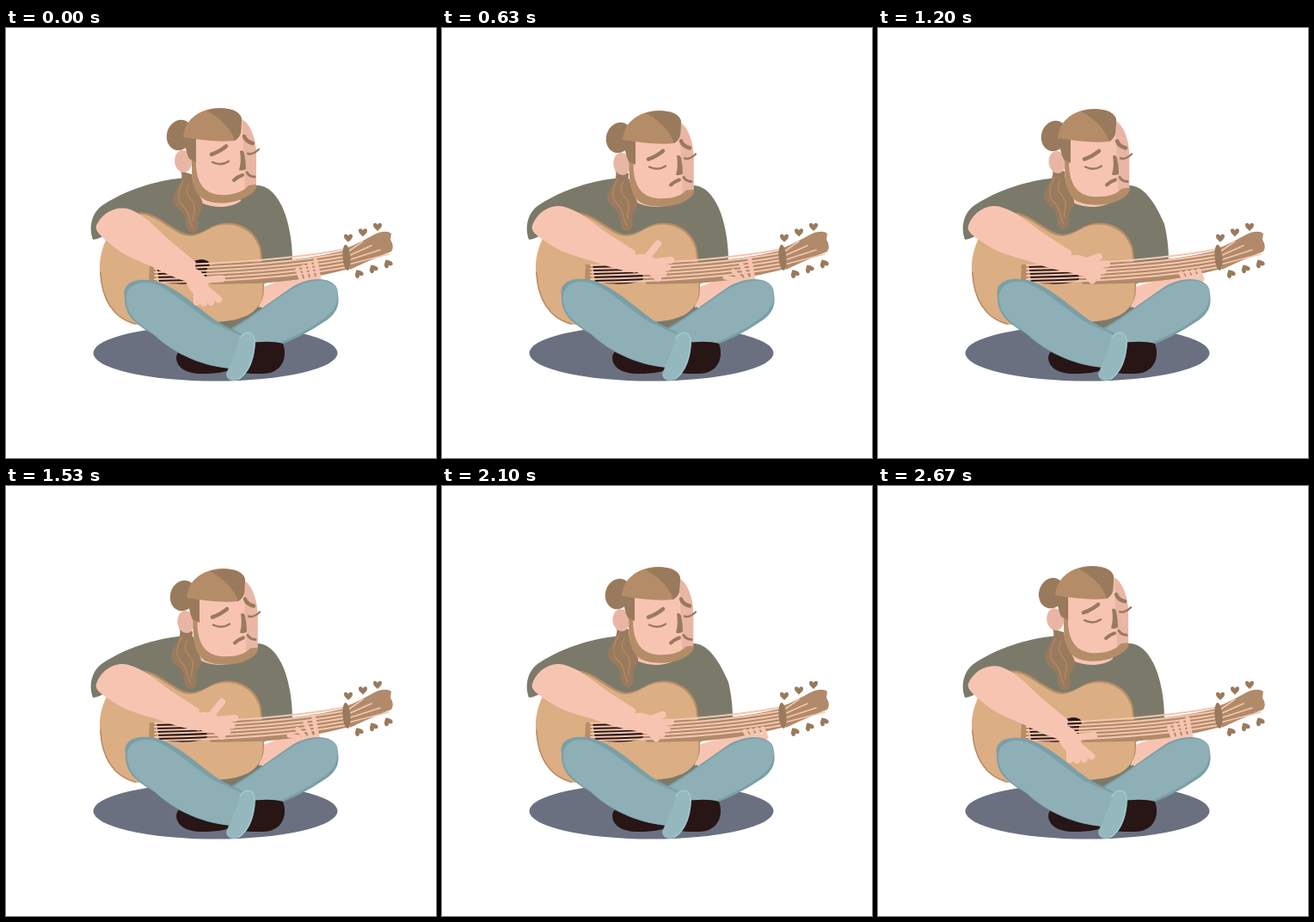
An HTML page with a canvas that plays this animation: 500 by 500 pixels, repeating every 2700 ms.

```html
<!DOCTYPE html>
<html lang="en">
<head>
<meta charset="utf-8">
<title>Guitarist</title>
<style>
  html, body { margin: 0; width: 100%; height: 100%; overflow: hidden; background: #fff; }
  canvas { display: block; width: 500px; height: 500px; }
</style>
</head>
<body>
<canvas id="stage" width="500" height="500"></canvas>
<script>
const ctx = document.getElementById('stage').getContext('2d');
const PERIOD = 900, STEP = 30;
const C = {
  shadow: '#6a7080', shirt: '#7b7a6a', skin: '#f8c4b2', blush: '#e9b6a6',
  jeans: '#8dafb5', denim: '#7b9fa6', cuff: '#94b8be', hem: '#a4cbd1', shoe: '#281516',
  wood: '#dcae83', edge: '#b88d66', neck: '#b18a6a',
  hair: '#9a7a5c', hairLight: '#b48c68', string: '#f5c6ad'
};

function ease(from, to, time) {
  const u = Math.min(1, Math.max(0, (time - from) / (to - from)));
  return u * u * (3 - 2 * u);
}

function fill(color, path) {
  ctx.fillStyle = color;
  ctx.fill(new Path2D(path));
}

function line(color, width, path) {
  ctx.strokeStyle = color;
  ctx.lineWidth = width;
  ctx.stroke(new Path2D(path));
}

function oval(color, x, y, rx, ry, angle = 0) {
  ctx.fillStyle = color;
  ctx.beginPath();
  ctx.ellipse(x, y, rx, ry, angle, 0, Math.PI * 2);
  ctx.fill();
}

function place(x, y, angle, draw) {
  ctx.save();
  ctx.translate(x, y);
  ctx.rotate(angle);
  draw();
  ctx.restore();
}

function drawBody(press) {
  oval(C.shadow, 243.5, 378, 142, 32.5);
  fill(C.shoe, 'M198 383C199 371 216 371 234 378L266 392C262 400 246 402 228 402C208 402 198 394 198 383Z');
  const reach = 5 * press;
  fill(C.shirt, `M101 246C96 232 99 214 114 205C139 189 173 177 207 174.5L291 183
    C308 182 322 202 ${328 + reach} 228C${332 + reach} 245 ${333 + reach} 258 ${333 + reach} 272
    L297 300L298 340L262 352L150 320L150 250L113 242Q106 246 101 246Z`);
}

function drawHead(lift, drift) {
  const x = 3 * lift + drift, y = lift + 2 * drift, nod = 5.5 * lift;
  fill(C.skin, 'M222 180L272 185L273 201C259 212 231 209 221 199Z');
  place(x, y, 0, () => oval(C.hair, 202, 124.5, 15, 18, .3));
  place(-lift - drift, 2 * drift - 4 * lift, 0, () => {
    fill(C.hair, `M203 166C209 178 194 190 194 200C195 209 205 212 208 219
      C210 226 208 236 216 238C225 238 224 229 223 222C223 215 230 213 229 205
      C228 195 217 190 219 171Z`);
    line(C.hairLight, 1.2, 'M206 178C199 191 199 202 207 208C214 215 212 225 217 232M213 181C205 194 217 198 219 206C221 213 216 218 218 224');
  });

  place(x * .4, y, 0, () => {
    const jaw = 183 + nod * .5, chin = 203 + nod * .2;
    fill(C.skin, `M213 128L273 106C283 108 291 128 291 149L291 ${jaw}
      C286 195 268 ${chin} 246 ${chin}C226 ${chin} 216 187 216 165Z`);
    fill(C.blush, `M275 107C285 113 291 130 291 149L291 ${jaw}L278 ${jaw + 7}L276 142Z`);
    oval(C.blush, 206 + x * .4, 155, 10, 13, -.12);
    fill(C.hairLight, `M213 140L221 146L221 160C222 180 230 ${chin - 11} 248 ${chin - 9}
      C264 ${chin - 8} 277 ${jaw + 7} 282 ${jaw}L291 ${jaw - 1}C293 ${jaw + 5} 286 ${jaw + 10} 278 ${jaw + 14}
      C264 ${chin + 2} 240 ${chin + 3} 228 ${chin - 5}C217 190 216 174 216 155Z`);
  });

  place(x, y, 0, () => {
    fill(C.hair, 'M208 126L221 129L221 156L213 152Q208 143 208 126Z');
    fill(C.hairLight, 'M206 127C207 109 222 94 247 93C263 93 274 98 274 108L273 122Q271 128 266 131C246 133 226 130 206 127Z');
    fill(C.hair, 'M233 96C250 91 271 93 274 105L273 122Q271 128 266 131C262 118 250 105 233 96Z');
  });

  place(lift, nod, 0, () => {
    line(C.hair, 4.5, 'M239 147Q248 144 256 137.5M277 126Q279 132 287 134');
    line(C.hair, 2.4, 'M240 156Q250 161 259 155M281 146Q287 148 294 141');
    fill(C.hair, 'M272 143Q276 141 277 146Q279 155 279 164Q274 167 271 165Q274 155 272 143Z');
    line(C.hair, 4, 'M265 177Q269 173 275 171');
    line(C.hair, 3, 'M280 168Q283 173 289 173');
  });
}

function drawHeart(x, y, angle) {
  place(x, y, angle, () => fill(C.hair, 'M0 5C-3 2-5 1-5-2C-5-5-1-5 0-2C1-5 5-5 5-2C5 1 3 2 0 5Z'));
}

function drawGuitar() {
  const body = `M109 282C108 247 129 221 151 217C168 214 183 229 200 238
    C216 247 226 239 240 232C264 222 289 235 295 258C297 275 300 292 298 312
    C294 332 275 341 240 342L150 345C124 338 110 314 109 282Z`;
  place(1.5, -2, 0, () => fill(C.edge, body));
  fill(C.wood, body);
  line(C.edge, 1.5, 'M110 284C111 314 124 337 150 344');
  fill(C.shoe, 'M175 275L214 275C219 268 234 267 237 274L235 291C230 299 195 299 178 295Z');
  fill(C.edge, 'M167 275L174 275L175 295L166 294Z');
  fill(C.neck, `M234 279C241 270 270 272 300 272Q350 269 393 259L399 280
    C362 290 322 296 290 297L238 298Q231 289 234 279Z`);
  fill(C.neck, 'M392 257C409 252 421 243 433 238Q444 235 448 239L447 246Q452 254 448 260C432 266 419 272 400 281Z');
  for (let i = 0; i < 6; i++) {
    line(C.string, 2, `M173 ${276 + i * 4}Q310 ${273 + i * 4.2} 396 ${257 + i * 4.2}`);
    if (i < 4) line(C.string, 1.6, `M398 ${260 + i * 5}L${415 + i * 10} ${248 + i * 5}`);
  }
  oval(C.hair, 396, 267, 4.5, 15, -.08);
  for (let i = 0; i < 3; i++) {
    drawHeart(398 + i * 17, 244 - i * 6.5, 0);
    drawHeart(410 + i * 17, 285.5 - i * 5.8, 2.6);
  }
}

function drawFretFingers(slide, press, drift) {
  for (let i = 0; i < 4; i++) {
    const x = 343 + 7 * i + slide;
    const tipX = x - 4 - drift * (8 - 2.5 * i);
    const tipY = 281 - 3.5 * i * (1 - .7 * press) + 4 * press + drift * (9 - 4 * i);
    line(C.skin, 5, `M${x} 292L${tipX} ${tipY}`);
  }
}

function drawLegs(lift) {
  fill(C.denim, `M262 349C286 335 309 317 330 303C352 288 379 289 385 303
    C388 318 388 328 374 339C352 354 325 369 290 377Z`);
  fill(C.jeans, `M264 350C287 336 310 318 332 304C354 291 380 290 385 304
    C387 317 384 327 371 337C350 352 325 365 290 376Z`);
  fill(C.shoe, 'M280 367C296 364 312 364 322 367C328 383 321 402 298 402C286 402 278 402 274 400Z');
  place(lift, -lift, 0, () => {
    fill(C.denim, `M138 312C135 298 148 291 165 293C190 294 218 321 241 338
      C258 350 270 352 275 357L265 396C232 395 196 380 172 357C150 344 137 334 138 312Z`);
    fill(C.jeans, `M140 318C138 302 151 293 170 297C191 303 217 328 240 343
      L274 358L265 396C232 394 196 379 172 356C153 343 142 335 140 318Z`);
  });
  fill(C.cuff, `M256 402C262 388 269 373 272 359C277 350 290 351 290 363
    C290 382 284 401 271 409C262 412 256 408 256 402Z`);
  line(C.hem, 1.2, 'M272 361C277 352 288 352 289 363C289 381 283 399 271 408');
}

function drawStrumArm(lift, drift) {
  const bend = .6 * (1 - lift) - .1 * drift;
  const thumb = -.45 - .35 * (1 - lift + drift);
  const finger = (angle, length) =>
    line(C.skin, 8, `M12 0L${length * Math.cos(angle)} ${length * Math.sin(angle)}`);
  place(116, 232, .43 - .12 * lift, () => {
    fill(C.skin, `M-11 2C-11-14 0-29 17-31C38-32 55-23 75-17L112-7L120 17
      C100 20 85 20 68 19C50 20 30 20 20 17C5 13-11 10-11 2Z`);
    place(112, 5, bend, () => {
      oval(C.skin, 14, 1, 18, 11.5);
      finger(thumb, 36);
      for (let i = 0; i < 4; i++) finger(-.23 + .2 * i, 45 - 3 * i);
    });
  });
}

function draw(now) {
  const time = Math.floor((now % PERIOD) / STEP) * STEP;
  const fall = ease(630, PERIOD, time);
  const lift = ease(0, 300, time) - fall;
  const drift = ease(300, 630, time) - fall;
  const press = lift - drift;
  const slide = 13 * press - 2 * drift;

  ctx.fillStyle = '#fff';
  ctx.fillRect(0, 0, 500, 500);
  ctx.lineCap = ctx.lineJoin = 'round';
  drawBody(press);
  drawHead(lift, drift);
  fill(C.skin, `M294 325L297 302Q316 294 ${336 + slide} 290L${362 + slide} 288L${366 + slide} 298L335 318Z`);
  drawGuitar();
  drawFretFingers(slide, press, drift);
  drawLegs(lift);
  drawStrumArm(lift, drift);
}

function tick() {
  draw(performance.now());
  requestAnimationFrame(tick);
}
tick();
</script>
</body>
</html>
```
